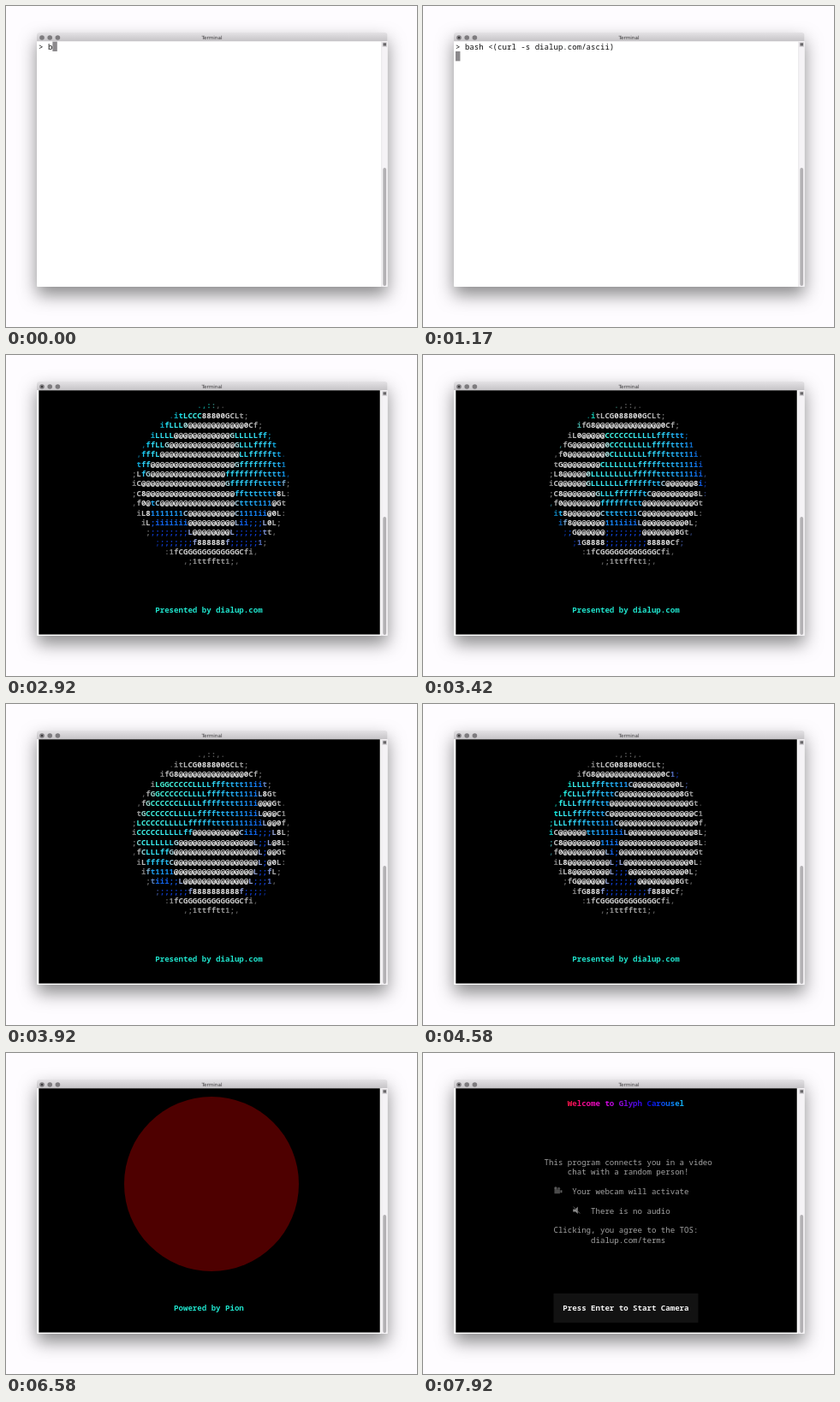
Write an HTML page with a canvas that moves like this. It is 480 by 375 pixels and loops after 8000 ms.

```html
<!DOCTYPE html>
<html lang="en">
<head>
<meta charset="utf-8">
<title>Terminal</title>
<style>
html, body { margin: 0; width: 100%; height: 100%; overflow: hidden; background: #fefcff; }
canvas { display: block; width: 480px; height: 375px; }
</style>
</head>
<body>
<canvas id="stage"></canvas>
<script>
const W = 480, H = 375, LOOP = 8000, FPS = 12;
const LEFT = 38, TOP = 42, COLS = 73, CW = 5.45, RH = 11.375;
const MONO = '"Noto Sans Mono", "DejaVu Sans Mono", monospace';
const TEAL = '#1fe2cb';
const COMMAND = 'bash <(curl -s dialup.com/ascii)';
const RAMP = ' .,:;i1tfLCG08@';
const RAD = Math.PI / 180;

// Scene starts, in steps of 1/12 s
const ENTER = 14, GLOBE = 22, GLOBE_END = 67, BADGE = 69, BADGE_END = 87, WELCOME = 89;

// Continents as ellipses: longitude, text row, and their radii
const CONTINENTS = [
  { lon: 265, row: 10.8, w: 92, h: 5.8 },
  { lon: 215, row: 6.5, w: 50, h: 3.2 },
  { lon: 38, row: 5.5, w: 32, h: 3 },
  { lon: 25, row: 8.5, w: 32, h: 3.5 },
  { lon: 48, row: 12.5, w: 20, h: 4 },
  { lon: 131, row: 12.3, w: 36, h: 3.8 },
  { lon: 145, row: 2, w: 110, h: 1.9 }
];
const ICE_ROW = 15.5;

const canvas = document.getElementById('stage');
const ctx = canvas.getContext('2d');
const dpr = window.devicePixelRatio || 1;
canvas.width = W * dpr;
canvas.height = H * dpr;

const clamp = (v, lo, hi) => Math.min(hi, Math.max(lo, v));
const mix = (a, b, k) => a + (b - a) * k;
const colX = col => LEFT + col * CW;
const rowY = row => TOP + row * RH;

function rect(x, y, w, h, fill) {
  ctx.fillStyle = fill;
  ctx.fillRect(x, y, w, h);
}

function roundRect(x, y, w, h, radii, fill) {
  ctx.fillStyle = fill;
  ctx.beginPath();
  ctx.roundRect(x, y, w, h, radii);
  ctx.fill();
}

function disc(x, y, r, fill) {
  ctx.fillStyle = fill;
  ctx.beginPath();
  ctx.arc(x, y, r, 0, 2 * Math.PI);
  ctx.fill();
}

function setFont(bold) {
  ctx.font = `${bold ? 'bold ' : ''}${CW / 0.6}px ${MONO}`;
}

function putChar(ch, col, row, fill) {
  ctx.fillStyle = fill;
  ctx.fillText(ch, colX(col), rowY(row) + 9);
}

// fill is a colour, or a function of the letter's index
function print(text, col, row, fill, bold) {
  setFont(bold);
  [...text].forEach((ch, i) => {
    putChar(ch, col + i, row, typeof fill === 'function' ? fill(i) : fill);
  });
}

const centerCol = text => Math.ceil((COLS - text.length) / 2);

function printCentered(text, row, fill, bold) {
  print(text, centerCol(text), row, fill, bold);
}

function drawWindow(n) {
  rect(0, 0, W, H, '#fefcff');
  ctx.save();
  ctx.shadowColor = 'rgba(0,0,0,0.46)';
  ctx.shadowBlur = 20 * dpr;
  ctx.shadowOffsetY = 9.5 * dpr;
  roundRect(36, 31, 409.5, 297, [3, 3, 1, 1], '#fff');
  ctx.restore();

  const bar = ctx.createLinearGradient(0, 31, 0, 41);
  bar.addColorStop(0, '#e4e2e5');
  bar.addColorStop(1, '#c6c4c7');
  roundRect(36, 31, 409.5, 10.3, [3, 3, 0, 0], bar);
  for (let i = 0; i < 3; i++) disc(42 + 9.2 * i, 37, 2.8, '#7d7b7e');
  if (n >= ENTER) disc(42, 37, 1.1, '#2c2b2d');

  ctx.font = '5.7px "DejaVu Sans", sans-serif';
  ctx.textAlign = 'center';
  ctx.fillStyle = '#3c3b3d';
  ctx.fillText('Terminal', 240.5, 39.2);
  ctx.textAlign = 'left';

  rect(438.5, 41.3, 7, 286.7, '#f5f3f6');
  rect(438.5, 41.3, 0.6, 286.7, '#dddbde');
  rect(439.5, 42.3, 5.5, 5.5, '#d4d2d5');
  rect(440.5, 43.3, 3.5, 3.2, '#69676a');
  roundRect(440.3, 189, 3.8, 138, 1.9, '#b3b1b4');
}

function drawPrompt(n) {
  const entered = n >= ENTER;
  const typed = COMMAND.slice(0, Math.floor(1 + 2.58 * n));
  print('> ' + typed, 0, 0, '#111');
  const col = entered ? 0 : 2 + typed.length;
  rect(colX(col), rowY(entered ? 1 : 0) - 0.4, CW, RH, '#8b898c');
}

function isLand(lon, row) {
  if (row > ICE_ROW) return true;
  return CONTINENTS.some(c => {
    const d = ((lon - c.lon + 180) % 360 + 360) % 360 - 180;
    return (d / c.w) ** 2 + ((row - c.row) / c.h) ** 2 < 1;
  });
}

// Deep blue to turquoise as the sea brightens
function cellColor(sea, light, land) {
  const k = (sea - 0.28) / 0.52;
  const dim = Math.min(1, 0.3 + light);
  const hue = 228 - 58 * k;
  const grey = 20 + 74 * light;
  const lightness = mix((46 + 15 * k) * dim, grey, land);
  return `hsl(${hue}, ${86 * (1 - land)}%, ${lightness}%)`;
}

function drawGlobe(n) {
  const turn = 80 * (n - 28) / FPS;
  const dither = 0.02;
  setFont(true);
  for (let row = 1; row <= 17; row++) {
    const y = (row - 9.25) / 8.5;
    const half = Math.sqrt(1 - y * y);
    const south = Math.max(0, y);
    for (let col = 19; col < 55; col++) {
      const x = (col + 0.5 - 36.9) / 17.2;
      if (Math.abs(x) >= half) continue;
      const z = Math.sqrt(half * half - x * x);
      const limb = clamp(2.5 * z - 0.36 - 0.1 * south, 0, 1);
      const light = Math.min(limb, 1 - 0.9 * Math.max(0, y - 0.62));
      const lonAt = dx => Math.asin(clamp((x + dx) / half, -1, 1)) / RAD + turn;

      const glow = 0.2 * Math.cos((lonAt(0) - 70) * RAD);
      const sea = clamp(0.44 + glow - 0.12 * x - 0.15 * y - 0.8 * south * south, 0.3, 0.82);
      const land = (isLand(lonAt(-dither), row) + isLand(lonAt(dither), row)) / 2;

      const v = mix(Math.min(sea, limb), light, land);
      const ch = RAMP[Math.floor(v * 14 + 0.01)];
      putChar(ch, col, row, cellColor(sea, light, land));
    }
  }
  printCentered('Presented by dialup.com', 22, TEAL, true);
}

function drawBadge(n) {
  ctx.globalAlpha = clamp(Math.min((n - BADGE + 1) / 6, (BADGE_END + 1 - n) / 5), 0, 1);
  disc(240, 153, 102, '#4e0000');
  ctx.globalAlpha = 1;
  printCentered('Powered by Pion', 22, TEAL, true);
}

function drawCameraIcon(x, y) {
  rect(x + 1, y + 3.5, 6.5, 5, '#4b4b4b');
  disc(x + 2.5, y + 2.3, 1.7, '#5a5a5a');
  disc(x + 6.2, y + 2.5, 1.5, '#484848');
  rect(x + 8, y + 4.5, 2, 3, '#5f5f5f');
}

function drawSpeakerIcon(x, y) {
  rect(x + 1, y + 4, 2.5, 3, '#8d8d8d');
  ctx.beginPath();
  ctx.moveTo(x + 2.5, y + 5.5);
  ctx.lineTo(x + 6.5, y + 1);
  ctx.lineTo(x + 6.5, y + 9.5);
  ctx.fill();
  ctx.strokeStyle = '#666';
  ctx.lineWidth = 0.9;
  ctx.beginPath();
  ctx.moveTo(x + 1.5, y + 1);
  ctx.lineTo(x + 9, y + 9);
  ctx.stroke();
}

// The icon stands four columns before its text
function printWithIcon(drawIcon, text, row, fill) {
  const col = centerCol(text) + 1;
  drawIcon(colX(col - 4), rowY(row));
  print(text, col, row, fill);
}

function drawWelcome(n) {
  const shift = 8 * (n - 95);
  const hue = i => `hsl(${345 - 6.1 * i + shift}, 92%, ${52 - 7 * Math.sin(i / 24 * Math.PI)}%)`;
  const grey = '#a2a2a2';
  printCentered('Welcome to Glyph Carousel', 1, hue, true);
  printCentered('This program connects you in a video', 7, grey);
  printCentered('chat with a random person!', 8, grey);
  printWithIcon(drawCameraIcon, 'Your webcam will activate', 10, grey);
  printWithIcon(drawSpeakerIcon, 'There is no audio', 12, grey);
  printCentered('Clicking, you agree to the TOS:', 14, grey);
  printCentered('dialup.com/terms', 15, grey);

  rect(colX(21), rowY(21), 31 * CW, 3 * RH, '#121212');
  printCentered('Press Enter to Start Camera', 22, '#f2f2f2', true);
}

function draw(t) {
  const n = Math.floor((t + 4) * FPS / 1000);
  ctx.setTransform(dpr, 0, 0, dpr, 0, 0);
  drawWindow(n);
  if (n < GLOBE) return drawPrompt(n);
  rect(38.3, 41.3, 398.4, 285.2, '#000');
  if (n < BADGE) drawGlobe(Math.min(n, GLOBE_END));
  else if (n < WELCOME) drawBadge(Math.min(n, BADGE_END));
  else drawWelcome(n);
}

const start = performance.now();
function tick() {
  draw((performance.now() - start) % LOOP);
  requestAnimationFrame(tick);
}
tick();
</script>
</body>
</html>
```
